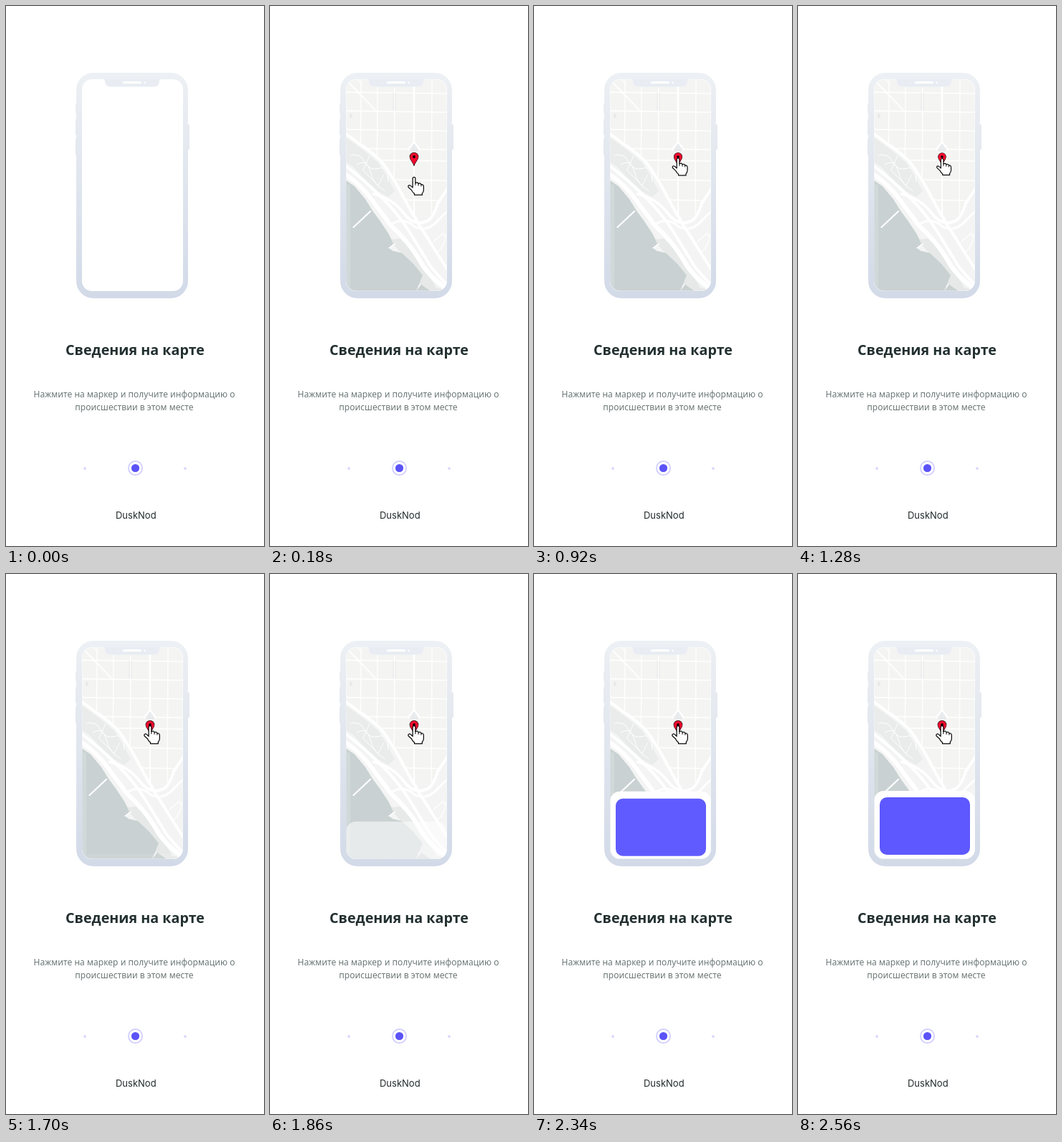
An HTML page with a canvas for the animation above (2880 ms loop, 360x752 px).

```html
<!DOCTYPE html>
<html lang="ru">
<head>
<meta charset="utf-8">
<title>Сведения на карте</title>
<style>
  html, body { margin: 0; width: 100%; height: 100%; overflow: hidden; background: #fff; }
  canvas, svg { position: absolute; left: 0; top: 0; width: 360px; height: 752px; }
  text { text-anchor: middle; font-family: "Noto Sans", "Open Sans", sans-serif; }
  .title { font-size: 19.7px; font-weight: 700; fill: #222f2f; }
  .body { font-size: 12.05px; fill: #6b7777; }
  .brand { font: 13px Inter, sans-serif; fill: #222b2b; }
</style>
</head>
<body>
<canvas id="stage" width="360" height="752"></canvas>
<svg viewBox="0 0 360 752">
  <text class="title" x="180" y="486.3">Сведения на карте</text>
  <text class="body" x="179" y="545">Нажмите на маркер и получите информацию о</text>
  <text class="body" x="179" y="563">происшествии в этом месте</text>
  <text class="brand" x="181.3" y="714">DuskNod</text>
</svg>
<script>
const LOOP = 2880;
const ctx = document.getElementById('stage').getContext('2d');

const clamp = v => Math.max(0, Math.min(1, v));
const easeOut = (t, start, end) => 1 - Math.pow(1 - clamp((t - start) / (end - start)), 3.5);

function box(x, y, w, h, r, fill) {
  ctx.beginPath();
  ctx.roundRect(x, y, w, h, r);
  ctx.fillStyle = fill;
  ctx.fill();
}

function dot(x, y, r, fill) {
  ctx.beginPath();
  ctx.arc(x, y, r, 0, Math.PI * 2);
  ctx.fillStyle = fill;
  ctx.fill();
}

function road(path, width = 1.3, color = '#fff') {
  ctx.strokeStyle = color;
  ctx.lineWidth = width;
  ctx.stroke(new Path2D(path));
}

function area(path, fill) {
  ctx.fillStyle = fill;
  ctx.fill(new Path2D(path));
}

function drawPhone() {
  const metal = ctx.createLinearGradient(0, 93, 0, 407);
  metal.addColorStop(0, '#edf0f4');
  metal.addColorStop(1, '#d2dae8');
  for (const [x, y, h] of [[97, 136, 13], [97, 157, 23], [97, 185, 23], [253, 165, 35]]) {
    box(x, y, 3, h, 1, metal);
  }
  box(98, 93, 156, 314, 24, metal);
  box(106, 102, 141, 295, 14, '#fff');
}

function drawNotch() {
  area('M136 102 H216 Q214 102 214 104 Q214 112.5 206 112.5 H146 Q138 112.5 138 104 Q138 102 136 102Z', '#e9edf3');
  box(163, 105, 26, 3, 1.5, '#fff');
  dot(193.5, 106.5, 1.6, '#f8fafc');
}

function drawMap() {
  ctx.fillStyle = '#f4f4f3';
  ctx.fillRect(106, 102, 141, 295);

  // City blocks
  box(111, 150, 4, 6, 1, '#e9eae9');
  for (const x of [127, 150, 174, 226]) road(`M${x} 102 L${x - 1} 292`);
  for (const y of [121, 147, 173, 199, 215, 242, 270]) road(`M106 ${y - 1} L247 ${y + 1}`);
  road('M106 103 L126 123 L149 147', 1.8);
  road('M122 102 L128 110', 1.2);
  for (const x of [172, 175]) road(`M${x} 121 V145`, 0.8, '#e4e5e4');
  area('M195 201 Q195 194 201 190 Q207 194 207 201 Q201 206 195 201Z', '#e9ebee');
  road('M201 102 V189 L193 200 M201 189 L209 200', 2.6);
  road('M201 205 V292', 2);

  // Waterfront
  area('M106 178 L126 193 L150 211 L167 231 L184 260 L201 291 L221 296 L247 255 V397 H106Z', '#f3f4f3');
  area('M106 183 L132 202 L151 218 L163 237 L174 258 L165 266 L149 257 L134 243 L116 224 L106 217Z', '#e9ecea');
  area('M166 325 L182 324 L206 349 L232 392 L247 397 H214 L190 352Z', '#e6e9e7');
  area('M106 243 L118 251 L133 269 L143 285 L154 300 L166 318 L172 331 L166 337 L171 341 L184 344 L200 359 L213 375 L204 397 H106Z', '#c9d1d2');
  area('M106 246 L112 250 V397 H106Z', '#d1d8d9');
  area('M204 397 L211 388 L224 397Z', '#c9d1d2');
  road('M140 286 L116.5 308', 2.2);
  road('M166 337 L175 331', 1.5);

  // Park paths
  road('M112 208 Q126 204 132 217 T153 226 T164 245', 1);
  road('M121 221 Q135 212 140 231 T160 257', 1);
  road('M139 208 L130 229 L151 250 L159 235', 0.9);

  // Highways
  road('M106 178 L126 193 Q151 209 161 224 Q177 247 187 268 L207 303 L247 366', 4);
  road('M106 235 Q126 248 143 271 L169 306 Q194 329 208 353 Q221 377 247 394', 6);
  road('M106 223 Q132 243 150 261 Q175 284 193 312 L225 364 L247 389', 4);
  road('M145 262 Q171 268 187 289 Q202 309 222 298 Q229 291 234 275 L247 255', 3.8);
  road('M171 303 Q188 294 201 307 Q216 315 230 303 L247 286', 3);
  road('M229 327 L241 317 L247 320 M232 344 Q246 333 244 318', 1.2);
}

function scaled(x, y, s, paint) {
  ctx.save();
  ctx.translate(x, y);
  ctx.scale(s, s);
  paint();
  ctx.restore();
}

function drawPin() {
  const shape = 'M0 12 C-1.2 6.8 -5.6 4.6 -5.6 0 A5.6 5.6 0 0 1 5.6 0 C5.6 4.6 1.2 6.8 0 12Z';
  road(shape, 1.4, '#16080a');
  area(shape, '#fa0a2e');
  dot(0, 0, 1.9, '#000');
}

function drawHand() {
  const shape = 'M-4.6 2 V-10.5 Q-4.6 -12.4 -2.7 -12.4 Q-.8 -12.4 -.8 -10.5 V-4.5 '
    + 'Q2.8 -6 3.3 -3.5 Q6.6 -4.7 7.2 -2.2 Q10.7 -2.6 10.7 1 V5 Q10.7 8 8.6 10 V12.3 H-2.2 '
    + 'V10.5 Q-5 8.5 -6.2 5.5 L-10.3 1.8 Q-11.8 -.4 -9.6 -1.2 Q-8 -1.6 -6.5 .2Z';
  area(shape, '#fff');
  road(shape, 1.25, '#0c0c0c');
  road('M-.8 -4.5 V-1.5 M3.3 -3.5 V-.8 M7.2 -2.2 V0', 1, '#0c0c0c');
}

function drawSheet(t) {
  const sheet = easeOut(t, 1680, 2560);
  const card = easeOut(t, 1895, 2560);
  ctx.globalAlpha = sheet;
  box(106, 397 - 95 * sheet, 141, 95, 14, '#fff');
  ctx.globalAlpha = card;
  box(114, 397 - 86 * card, 126, 80, 10, '#5d58ff');
  ctx.globalAlpha = 1;
}

function drawScreen(t) {
  ctx.save();
  ctx.beginPath();
  ctx.roundRect(106.5, 102.5, 140, 294, 13.5);
  ctx.clip();
  drawMap();
  const press = 1 - 0.1 * Math.sin(Math.PI * clamp((t - 860) / 580));
  scaled(201, 210, press, drawPin);
  scaled(203.7, 224 + 64 * (1 - easeOut(t, 0, 820)), press, drawHand);
  drawSheet(t);
  ctx.restore();
}

function drawPager() {
  dot(110, 644, 2, '#dddbfc');
  dot(250, 644, 2, '#dddbfc');
  dot(180.5, 643.5, 10.5, '#cfccfd');
  dot(180.5, 643.5, 8.8, '#fff');
  dot(180.5, 643.5, 5.6, '#5b52f8');
}

function frame(now) {
  const t = Math.floor((now % LOOP) / 20) * 20;
  ctx.fillStyle = '#fff';
  ctx.fillRect(0, 0, 360, 752);
  ctx.lineJoin = ctx.lineCap = 'round';
  drawPhone();
  if (t >= 20) drawScreen(t);
  drawNotch();
  drawPager();
  requestAnimationFrame(frame);
}

frame(0);
</script>
</body>
</html>
```
